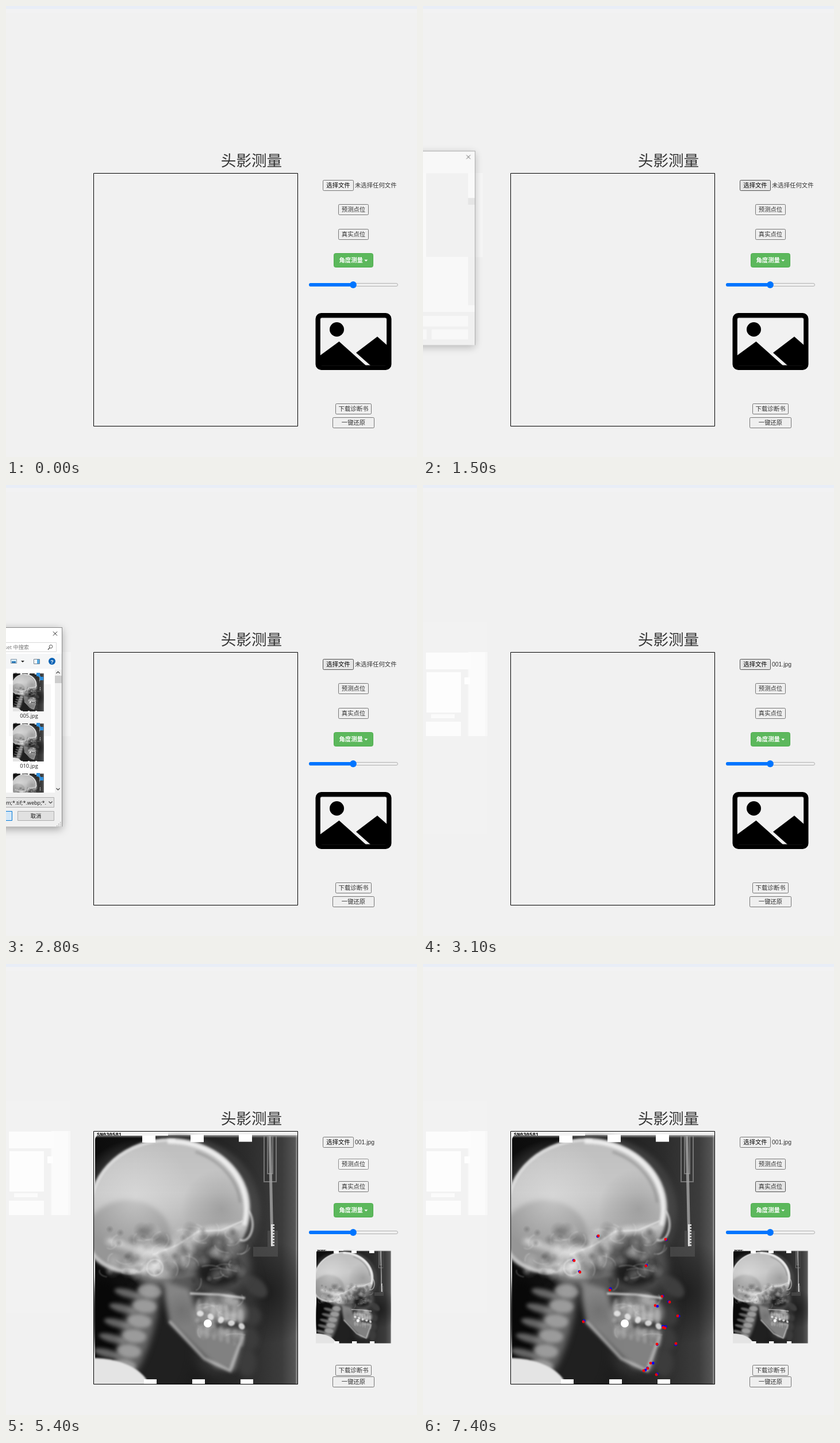
These frames come from a looping animation (715x783 px, 8000 ms). An HTML page with a canvas:

```html
<!DOCTYPE html>
<html lang="zh-CN">
<head>
<meta charset="utf-8">
<style>
html, body { margin: 0; width: 100%; height: 100%; overflow: hidden; background: #f1f1f1; }
canvas { display: block; }
</style>
</head>
<body>
<canvas id="stage" width="715" height="783"></canvas>
<script>
const W = 715, H = 783, LOOP = 8000, TAU = Math.PI * 2;
const FONT = '"Liberation Sans", "Noto Sans CJK SC", "Noto Sans CJK", sans-serif';
const UI_FONT = '"Open Sans", "Noto Sans CJK SC", "Noto Sans CJK", sans-serif';
const stage = document.getElementById('stage').getContext('2d');

let seed = 7;
const random = () => (seed = seed * 16807 % 2147483647) / 2147483647;
const between = (a, b) => a + random() * (b - a);

function layer(draw) {
  const canvas = document.createElement('canvas');
  canvas.width = W;
  canvas.height = H;
  draw(canvas.getContext('2d'));
  return canvas;
}
function rect(c, x, y, w, h, fill) {
  c.fillStyle = fill;
  c.fillRect(x, y, w, h);
}
function box(c, x, y, w, h, r, fill, line) {
  c.beginPath();
  c.roundRect(x, y, w, h, r);
  if (fill) { c.fillStyle = fill; c.fill(); }
  if (line) { c.strokeStyle = line; c.lineWidth = 1; c.stroke(); }
}
function disc(c, x, y, r, fill) {
  c.fillStyle = fill;
  c.beginPath();
  c.arc(x, y, r, 0, TAU);
  c.fill();
}
function poly(c, pts, fill) {
  c.fillStyle = fill;
  c.beginPath();
  for (let i = 0; i < pts.length; i += 2) c.lineTo(pts[i], pts[i + 1]);
  c.fill();
}
function stroke(c, pts, color, width = 1) {
  c.strokeStyle = color;
  c.lineWidth = width;
  c.beginPath();
  for (let i = 0; i < pts.length; i += 2) c.lineTo(pts[i], pts[i + 1]);
  c.stroke();
}
function text(c, str, x, y, size, color = '#333', align = 'center', weight = 400, family = FONT) {
  c.font = `${weight} ${size}px ${family}`;
  c.textAlign = align;
  c.fillStyle = color;
  c.fillText(str, x, y);
}

// ---- radiograph ----
const gray = (v, a = 1) => `rgba(${v},${v},${v},${a})`;

function blurred(c, radius, draw) {
  c.filter = `blur(${radius}px)`;
  draw();
  c.filter = 'none';
}
function oval(c, x, y, rx, ry, fill, blur = 3, tilt = 0) {
  blurred(c, blur, () => {
    c.fillStyle = fill;
    c.beginPath();
    c.ellipse(x, y, rx, ry, tilt, 0, TAU);
    c.fill();
  });
}
function rim(c, x, y, rx, ry, from, to, color, width, blur = 1.5) {
  blurred(c, blur, () => {
    c.strokeStyle = color;
    c.lineWidth = width;
    c.beginPath();
    c.ellipse(x, y, rx, ry, 0, from, to);
    c.stroke();
  });
}
function glow(c, x, y, r, v, a) {
  const g = c.createRadialGradient(x, y, 0, x, y, r);
  g.addColorStop(0, gray(v, a));
  g.addColorStop(1, gray(v, 0));
  disc(c, x, y, r, g);
}
function ramp(c, x0, y0, x1, y1, stops) {
  const g = c.createLinearGradient(x0, y0, x1, y1);
  stops.forEach(([at, v, a]) => g.addColorStop(at, gray(v, a)));
  return g;
}
// Mottled bone: soft light and dark spots with a few fine arcs
function mottle(c, x, y, w, h, count) {
  for (let i = 0; i < count; i++) {
    const px = x + random() * w, py = y + random() * h, start = random() * TAU;
    glow(c, px, py, between(6, 16), random() < .5 ? 25 : 235, .22);
    if (i % 3 === 0) rim(c, px, py, between(8, 26), between(6, 18), start, start + 1.6, gray(235, .35), 1.4, .8);
  }
}

function drawFilm(c) {
  rect(c, 152, 290, 356, 440, '#f4f4f4');
  box(c, 155, 297, 360, 440, 8, ramp(c, 153, 0, 508, 0, [[0, 12], [.4, 22], [.75, 44], [.92, 60], [.985, 85], [1, 170]]));
  glow(c, 455, 570, 90, 14, .6);
  rect(c, 155, 291, 353, 11, ramp(c, 0, 295, 0, 302, [[0, 240, .9], [1, 200, 0]]));
}
function drawSoftTissue(c) {
  oval(c, 300, 430, 144, 131, gray(62), 4);
  oval(c, 365, 590, 72, 122, gray(52), 9);
  oval(c, 434, 560, 25, 14, gray(62), 3, .7);
  for (let i = 0; i < 3; i++) oval(c, 427 - i * 4, 612 + i * 40, 17, 17 + i * 4, gray(60), 4);
  oval(c, 270, 660, 65, 110, gray(32), 12);
  oval(c, 172, 610, 25, 65, gray(8), 9);
}
function drawCranium(c) {
  oval(c, 285, 425, 140, 122, ramp(c, 0, 300, 0, 545, [[0, 190], [.4, 200], [.7, 175], [1, 120]]), 2);
  oval(c, 212, 472, 74, 62, gray(150), 4);
  glow(c, 225, 405, 100, 222, .65);
  glow(c, 375, 425, 70, 130, .5);
  rim(c, 285, 425, 137, 119, -Math.PI, -1.5, gray(228, .7), 5);
  rim(c, 285, 425, 133, 117, -1.6, .25, gray(245, .85), 8, 2);
  rim(c, 285, 425, 123, 106, -1.2, -.1, gray(125, .5), 4, 2);
  rim(c, 218, 470, 78, 64, .4 * Math.PI, .95 * Math.PI, gray(235, .7), 7, 2);
}
function drawFace(c) {
  oval(c, 372, 520, 52, 52, gray(82, .95), 7);
  oval(c, 368, 536, 36, 24, gray(22, .85), 6);
  oval(c, 300, 560, 28, 46, gray(100, .8), 8);
  rim(c, 412, 452, 17, 28, -1, 1.9, gray(215, .75), 4);
  glow(c, 257, 522, 46, 248, .85);
  blurred(c, 4, () => stroke(c, [175, 480, 250, 503, 295, 490, 335, 465, 415, 455], gray(235, .55), 11));
  blurred(c, 1, () => stroke(c, [255, 505, 298, 488, 335, 464, 375, 462, 412, 446], gray(240, .55), 2.5));
  mottle(c, 180, 460, 140, 80, 60);
  mottle(c, 315, 460, 95, 95, 50);
  rim(c, 259, 527, 14, 14, 0, TAU, gray(240, .6), 2, .8);
}
function drawSpine(c) {
  oval(c, 228, 640, 26, 95, gray(115, .85), 6, .3);
  for (let i = 0; i < 6; i++) {
    const x = 250 - i * 9, y = 568 + i * 26;
    oval(c, x, y, 21, 12, gray(178, .7), 3, .1);
    oval(c, x - 38, y + 4, 24, 7, gray(150, .65), 3, .25);
  }
}
function drawJaw(c) {
  blurred(c, 4, () => poly(c, [275, 550, 318, 565, 340, 632, 416, 634, 397, 707, 365, 700, 284, 622], gray(138, .9)));
  glow(c, 305, 600, 32, 90, .4);
  blurred(c, 2, () => stroke(c, [284, 620, 345, 685, 390, 706, 412, 645], gray(225, .6), 5));
  oval(c, 372, 606, 46, 34, gray(150, .9), 5);
  blurred(c, 1.5, () => stroke(c, [320, 572, 370, 574, 416, 580], gray(235, .7), 4));
  oval(c, 388, 626, 30, 7, gray(35, .7), 3);
  for (let i = 0; i < 7; i++) {
    const x = 336 + i * 12, y = 595 + i * 3;
    oval(c, x, y, 5, 14, gray(200, .5), 2);
    oval(c, x + 2, y + 38, 5, 14, gray(190, .35), 2);
  }
  mottle(c, 330, 580, 75, 70, 24);
  for (let i = 0; i < 5; i++) oval(c, 338 + i * 18, 607 + i * 5.5, 6, 5, gray(235, .85), 1, i);
  oval(c, 351, 624, 7, 7, '#fff', .6);
}
function drawHolder(c) {
  c.strokeStyle = gray(145, .7);
  c.lineWidth = 2;
  c.strokeRect(449, 298, 21, 80);
  c.strokeRect(455, 298, 9, 66);
  stroke(c, [459, 298, 463, 488], gray(165, .8), 5);
  poly(c, [455, 463, 473, 463, 473, 508, 430, 508, 430, 491, 455, 491], gray(85, .6));
  rect(c, 461, 452, 3, 38, '#ddd');
  for (let y = 452; y < 490; y += 5) rect(c, 463, y, 4, 2.5, '#ddd');
}
function drawClips(c) {
  oval(c, 150, 740, 100, 56, gray(228), 1.5);
  for (let i = 0; i < 3; i++) {
    rect(c, 237 + i * 84, 297 - i * .7, 23, 13, '#fff');
    rect(c, 240 + i * 84, 721, 22, 9, '#fff');
  }
  c.beginPath();
  c.rect(152, 290, 130, 8);
  c.clip();
  rect(c, 152, 290, 130, 8, '#f4f4f4');
  text(c, 'SN030581', 158, 299, 9, '#000', 'left', 700, '"Liberation Mono", monospace');
}
const radiograph = layer(c => {
  c.beginPath();
  c.rect(152, 290, 356, 440);
  c.clip();
  for (const part of [drawFilm, drawSoftTissue, drawCranium, drawFace, drawSpine, drawJaw, drawHolder, drawClips]) part(c);
});
const film = (c, x, y, w, h) => c.drawImage(radiograph, 152, 290, 356, 440, x, y, w, h);

// ---- file dialog ----
function dialogBase(c, fill) {
  c.shadowColor = 'rgba(0,0,0,.35)';
  c.shadowBlur = 14;
  c.shadowOffsetY = 4;
  rect(c, -60, 247, 157, 346, fill);
  c.shadowColor = 'transparent';
  c.strokeStyle = '#8a8a8a';
  c.lineWidth = 1;
  c.strokeRect(-60.5, 247.5, 158, 345);
  stroke(c, [82, 254.5, 89, 261.5], '#222');
  stroke(c, [89, 254.5, 82, 261.5], '#222');
}
const emptyDialog = layer(c => {
  dialogBase(c, '#fbfbfb');
  rect(c, 10, 287, 75, 149, '#f0f0f0');
  rect(c, 85, 331, 12, 191, '#f0f0f0');
  rect(c, 85, 331, 12, 12, '#dedede');
  rect(c, 0, 534, 97, 59, '#f0f0f0');
  rect(c, 0, 541, 85, 19, '#fbfbfb');
  rect(c, 0, 565, 11, 18, '#fbfbfb');
  rect(c, 20, 565, 65, 18, '#fbfbfb');
});
function drawToolbar(c) {
  box(c, -10.5, 273.5, 98, 16, 0, null, '#d9d9d9');
  text(c, 'set 中搜索', 40, 285, 9.2, '#777', 'right', 400, UI_FONT);
  rim(c, 78, 280.5, 2.8, 2.8, 0, TAU, '#555', 1, 0);
  stroke(c, [76, 282.5, 73, 286], '#555', 1.3);
  rect(c, 0, 293, 97, 26, '#f5f6f7');
  box(c, 8.5, 302.5, 10, 7, 0, '#d5ebfa', '#8a9aa8');
  rect(c, 10, 306, 7, 3, '#2b7ab8');
  poly(c, [26, 305, 32, 305, 29, 308], '#222');
  box(c, 48.5, 302.5, 10, 8, 0, '#fff', '#708090');
  rect(c, 54, 303, 4, 7, '#55a8e0');
  disc(c, 80, 306, 6, '#0b63b5');
  text(c, '?', 80, 309.5, 9, '#fff', 'center', 700);
}
function drawFiles(c) {
  c.save();
  c.beginPath();
  c.rect(0, 320, 85, 214);
  c.clip();
  rect(c, 5, 346, 73, 90, '#f7f7f7');
  ['005.jpg', '010.jpg', '015.jpg'].forEach((name, i) => {
    const y = 326 + i * 87;
    film(c, 12, y, 54, 67);
    rect(c, 53, y, 6, 6, '#2f8fdd');
    rect(c, 59, y + 7, 6, 6, '#2f8fdd');
    stroke(c, [55, y + 3, 63, y + 11], '#2f8fdd', 3);
    text(c, name, 40, y + 78, 9.3, '#222', 'center', 400, UI_FONT);
  });
  c.restore();
  rect(c, 85, 320, 12, 214, '#f0f0f0');
  rect(c, 85, 331, 12, 13, '#cdcdcd');
  chevron(c, 90.5, 325.5, -1);
  chevron(c, 90.5, 528, 1);
}
function chevron(c, x, y, dir) {
  stroke(c, [x - 3, y - 1.5 * dir, x, y + 1.5 * dir, x + 3, y - 1.5 * dir], '#444', 1.2);
}
function drawFooter(c) {
  rect(c, 0, 534, 97, 59, '#f0f0f0');
  box(c, -20.5, 542.5, 104, 17, 0, '#e5e5e5', '#adadad');
  text(c, 'cbm;*.tif;*.webp;*.', 70, 554.5, 9.1, '#111', 'right', 400, UI_FONT);
  chevron(c, 77.5, 551, 1);
  box(c, -40.5, 566.5, 51, 16, 0, '#d3e7f7', '#0078d7');
  box(c, 20.5, 566.5, 63, 16, 0, '#e1e1e1', '#adadad');
  text(c, '取消', 52, 578, 9.3, '#111', 'center', 400, UI_FONT);
  for (let i = 0; i < 3; i++)
    for (let j = 0; j <= i; j++) rect(c, 94 - j * 3, 585 + i * 3, 1.5, 1.5, '#aaa');
}
const dialog = layer(c => {
  dialogBase(c, '#fff');
  drawToolbar(c);
  drawFiles(c);
  drawFooter(c);
});

// Window scales around its own centre while it fades
function showDialog(image, shown) {
  const scale = 1 - (1 - shown) * .085;
  stage.save();
  stage.globalAlpha = shown;
  stage.translate(-172, 420);
  stage.scale(scale, scale);
  stage.translate(172, -420);
  stage.drawImage(image, 0, 0);
  stage.restore();
}
function drawAfterglow() {
  rect(stage, 0, 237, 112, 369, '#f2f2f2');
  rect(stage, 78, 290, 34, 146, '#f8f8f8');
  rect(stage, 80, 290, 28, 146, '#fbfbfb');
  rect(stage, 5, 291, 78, 29, '#fcfcfc');
  rect(stage, 6, 325, 60, 70, '#fdfdfd');
  rect(stage, 72, 334, 10, 12, '#fefefe');
  rect(stage, 14, 398, 41, 7, '#fbfbfb');
  rect(stage, 5, 411, 61, 25, '#fcfcfc');
}
function drawDialog(t) {
  if (t < 1500) return;
  if (t >= 3100) return drawAfterglow();
  const frame = Math.floor(t / 100) * 100;
  const opening = 1 - .3 * Math.max(0, (1800 - frame) / 300) ** 2;
  const closing = Math.min(1, (3100 - frame) / 300);
  rect(stage, 0, 290, t < 1600 ? 104 : 113, 146, '#f6f6f6');
  showDialog(t < 1600 ? emptyDialog : dialog, opening * closing);
}

// ---- page ----
const BUTTON = {
  normal: ['#efefef', '#767676'],
  hover: ['#e5e5e5', '#4f4f4f'],
  active: ['#f5f5f5', '#8d8d8d'],
};
function button(label, x, y, w, state = 'normal', color = '#333') {
  box(stage, x + .5, y + .5, w - 1, 18, 1.8, ...BUTTON[state]);
  text(stage, label, x + w / 2, y + 13.2, 10.36, color);
}
// Button is held down for the 100 ms before its click takes effect
const press = (t, from, click, to) =>
  t < from || t >= to ? 'normal' : t >= click - 100 && t < click ? 'active' : 'hover';

function slider(y) {
  box(stage, 527.5, y - 2.5, 154, 5, 2.5, '#efefef', '#b2b2b2');
  box(stage, 527, y - 3, 77, 6, 3, '#0075ff');
  disc(stage, 604, y, 5.9, '#0075ff');
}
function greenButton(y, dark) {
  box(stage, 570.5, y + .5, 68, 24, 3, ...(dark ? ['#449d44', '#398439'] : ['#5cb85c', '#4cae4c']));
  text(stage, '角度测量', 600.2, y + 16.2, 10.36, '#fff', 'center', 700);
  poly(stage, [623.3, y + 11.5, 629.3, y + 11.5, 626.3, y + 14.5], '#fff');
}
function pictureIcon() {
  box(stage, 538.5, 533, 132, 99, 10, '#000');
  box(stage, 546.5, 541, 116, 83, 3, '#f1f1f1', '#222');
  disc(stage, 575.5, 561.5, 12.5, '#000');
  poly(stage, [546, 607, 579.5, 582.5, 626, 624, 546, 624], '#000');
  poly(stage, [609, 602, 646, 574, 663, 589, 663, 624, 634, 624], '#000');
}

// Key points of the face; each prediction lies a little off its true place
const LANDMARKS = [
  [305, 472], [422, 478], [263, 515], [273, 535], [388, 524], [325, 566], [416, 577], [404, 593], [429, 587],
  [443, 611], [418, 631], [421, 632], [407, 660], [440, 659], [396, 693], [391, 702], [384, 706], [406, 713], [279, 621],
].map(([x, y]) => ({ x, y, px: x + between(-1.5, 5), py: y + between(-2.5, 2) }));

function draw(now) {
  const t = now % LOOP, loaded = t >= 3600;
  rect(stage, 0, 0, W, H, '#f1f1f1');
  rect(stage, 0, 0, W, 5, '#e8edf7');
  rect(stage, 0, 5, W, 7, '#f2f2f3');
  drawDialog(t);

  text(stage, '头影测量', 427, 277.5, 26.6);
  if (loaded) film(stage, 152, 290, 356, 440);
  box(stage, 152.5, 290.5, 355, 439, 0, null, '#000');

  const fileY = loaded ? 300 : 302;
  button('选择文件', 551, fileY, 54, t >= 600 && !loaded ? 'hover' : 'normal', '#000');
  text(stage, t >= 2900 ? '001.jpg' : '未选择任何文件', 607, fileY + 13, 10.36, '#333', 'left');
  button('预测点位', 578, loaded ? 338 : 344, 53, press(t, 4200, 5500, 6600));
  button('真实点位', 578, loaded ? 377 : 387, 53, press(t, 6600, 7400, LOOP));
  greenButton(loaded ? 415 : 429, loaded && t < 3900);
  slider(loaded ? 466 : 484);
  if (loaded) film(stage, 539, 495, 131, 163.5);
  else pictureIcon();
  button('下载诊断书', 573, loaded ? 696 : 690, 63);
  button('一键还原', 568, loaded ? 716 : 714, 73);

  if (t >= 5500) for (const p of LANDMARKS) disc(stage, p.px, p.py, 2.4, '#00f');
  if (t >= 7400) for (const p of LANDMARKS) disc(stage, p.x, p.y, 2.4, '#f00');
}
function tick() {
  draw(performance.now());
  requestAnimationFrame(tick);
}
tick();
</script>
</body>
</html>
```
